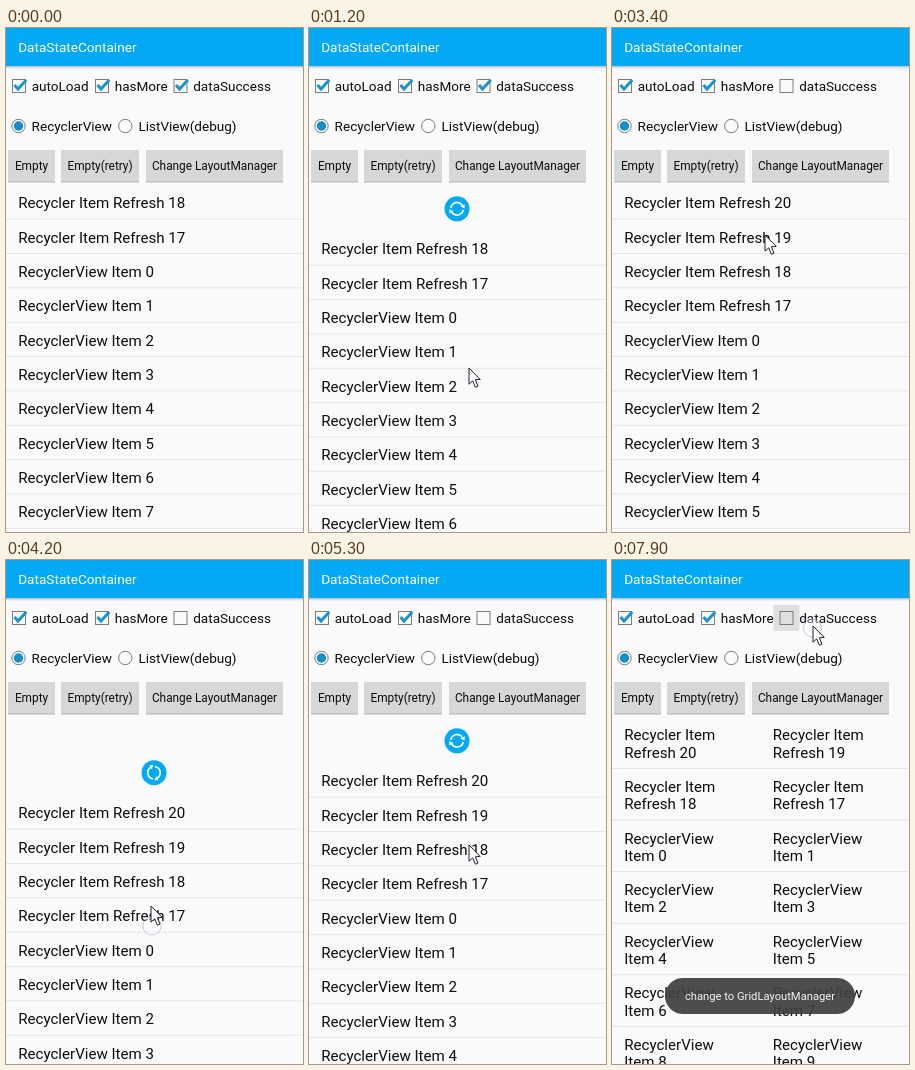
Animation, 297 px wide and 504 px high, one loop 8000 ms. Source, as an HTML page with a canvas:

```html
<!DOCTYPE html>
<html lang="en">
<head>
<meta charset="utf-8">
<title>DataStateContainer</title>
<style>
  html, body { margin: 0; width: 100%; height: 100%; overflow: hidden; background: #fafafa; }
  canvas { display: block; width: 297px; height: 504px; }
</style>
</head>
<body>
<canvas id="stage"></canvas>
<script>
const W = 297, H = 504, LOOP = 8000, STEP = 100;
const LIST_TOP = 157, ROW = 34.35, GRID_ROW = 51.6, REST = 46;
const LABEL = 13.55, ITEM = 15.1;
const BLUE = '#03a9f4', INK = '#0c0c0c', LINE = '#e6e6e6', FONT = 'Roboto, sans-serif';

const canvas = document.getElementById('stage');
const ctx = canvas.getContext('2d');
const dpr = window.devicePixelRatio || 1;
canvas.width = Math.round(W * dpr);
canvas.height = Math.round(H * dpr);

// Pointer path: time, x, y
const path = [
  [200, 176, 110], [500, 150, 200], [900, 148, 358], [1000, 150, 352],
  [1200, 160, 340], [2500, 160, 340], [2900, 206, 64], [3200, 207, 62],
  [3300, 208.5, 60.5], [3400, 153, 207], [3500, 153, 207], [4000, 148, 375],
  [4100, 146, 366], [4200, 145, 346], [4600, 158, 290], [5300, 160, 285],
  [5900, 171, 268], [6100, 175, 258], [6500, 175, 258], [6800, 179.5, 153],
  [7000, 183, 142], [7300, 184, 140], [7600, 199, 74], [7900, 201, 66]
];

const pulls = [
  { start: 600, y: 200, release: 1000, rest: 1200, done: 1600, end: 1900, spin: 1200 },
  { start: 3600, y: 207, release: 4200, rest: 4500, done: 5500, end: 5900, spin: 5300 }
];

const clamp = v => Math.max(0, Math.min(1, v));
const smooth = v => v * v * (3 - 2 * v);
const progress = (t, a, b) => clamp((t - a) / (b - a));
const within = (t, a, b) => t >= a && t < b;

function pointer(t) {
  const i = path.findIndex(k => k[0] >= t);
  if (i === 0) return { x: path[0][1], y: path[0][2] };
  const a = path[i - 1], b = path[i];
  const p = smooth(progress(t, a[0], b[0]));
  return { x: a[1] + (b[1] - a[1]) * p, y: a[2] + (b[2] - a[2]) * p };
}

// The device touch trails the pointer by one step
const touch = t => pointer(t - STEP);

function pullState(t) {
  const p = pulls.find(q => within(t, q.start, q.end));
  if (!p) return { offset: 0, icon: false, angle: 0 };
  const drag = s => Math.max(0, 0.49 * (touch(s).y - p.y));
  let offset, angle;
  if (t <= p.release) {
    offset = drag(t);
    angle = offset / 78 * Math.PI / 2;
  } else {
    const ease = 1 - (1 - progress(t, p.release, p.rest)) ** 2;
    offset = drag(p.release) + (REST - drag(p.release)) * ease;
    if (t > p.done) offset *= 1 - smooth(progress(t, p.done, p.end));
    angle = (t - p.spin) / 800 * Math.PI * 2;
  }
  return { offset, icon: t <= p.done, angle };
}

function text(s, x, y, size, color = INK, align = 'left') {
  ctx.font = `${size}px ${FONT}`;
  ctx.fillStyle = color;
  ctx.textAlign = align;
  ctx.fillText(s, x, y);
}

function rect(x, y, w, h, color) {
  ctx.fillStyle = color;
  ctx.fillRect(x, y, w, h);
}

function circle(x, y, r, fill, stroke, width = 1) {
  ctx.beginPath();
  ctx.arc(x, y, r, 0, Math.PI * 2);
  if (fill) { ctx.fillStyle = fill; ctx.fill(); }
  if (stroke) { ctx.strokeStyle = stroke; ctx.lineWidth = width; ctx.stroke(); }
}

function trace(points) {
  ctx.beginPath();
  points.forEach(([x, y]) => ctx.lineTo(x, y));
}

function toolbar() {
  rect(0, 0, W, 38, BLUE);
  const shadow = ctx.createLinearGradient(0, 38, 0, 41);
  shadow.addColorStop(0, '#b4c0c6');
  shadow.addColorStop(1, '#fafafa');
  rect(0, 38, W, 3, shadow);
  text('DataStateContainer', 12.2, 24.2, 13.6, '#fff');
}

function checkbox(x, label, checked, pressed) {
  if (pressed) rect(x - 6, 45, 26, 26, '#dfdfdf');
  ctx.strokeStyle = '#7c7c7c';
  ctx.lineWidth = 1;
  ctx.strokeRect(x + 0.5, 51.5, 13, 13);
  if (checked) {
    trace([[x + 2.5, 57], [x + 6, 61], [x + 14.3, 52]]);
    ctx.strokeStyle = '#1795cf';
    ctx.lineWidth = 3;
    ctx.stroke();
  }
  text(label, x + 19.7, 63.3, LABEL);
}

function radio(x, label, on) {
  circle(x, 98, 6.7, null, '#7c7c7c');
  if (on) circle(x, 98, 4.7, '#1490c8');
  text(label, x + 13.1, 102.8, LABEL);
}

function button(x, w, label, pressed) {
  rect(x, 122, w, 32, pressed ? '#bcbdbd' : '#d6d7d7');
  rect(x, 153.5, w, 1, '#b4b4b4');
  text(label, x + w / 2, 142.4, 11.85, INK, 'center');
}

function refreshIcon(y, angle) {
  ctx.save();
  ctx.translate(148, y);
  circle(0, 0, 12.5, BLUE);
  ctx.rotate(angle);
  ctx.lineWidth = 1.7;
  for (let i = 0; i < 2; i++) {
    ctx.beginPath();
    ctx.arc(0, 0, 6.3, Math.PI * 1.05, Math.PI * 1.83);
    ctx.strokeStyle = '#fff';
    ctx.stroke();
    trace([[3.4, -2.2], [7.6, -4.6], [7.6, -0.4]]);
    ctx.fillStyle = '#fff';
    ctx.fill();
    ctx.rotate(Math.PI);
  }
  ctx.restore();
}

function items(t) {
  const list = (t >= 2000 ? [20, 19, 18, 17] : [18, 17])
    .map(n => ['Recycler Item', `Refresh ${n}`]);
  for (let n = 0; n < 10; n++) list.push(['RecyclerView', `Item ${n}`]);
  return list;
}

function drawList(t) {
  const { offset, icon, angle } = pullState(t);
  const top = LIST_TOP + offset;
  const grid = t >= 7100;
  ctx.save();
  ctx.beginPath();
  ctx.rect(0, LIST_TOP, W, H - LIST_TOP);
  ctx.clip();
  if (icon && offset > 0) refreshIcon(top - 22.2, angle);
  items(t).forEach((item, i) => {
    if (grid) {
      const y = top + Math.floor(i / 2) * GRID_ROW;
      const x = i % 2 ? 160.8 : 12.2;
      item.forEach((line, k) => text(line, x, y + 23.3 + k * 17.2, ITEM));
      if (i % 2) rect(0, y + GRID_ROW - 0.7, W, 1, LINE);
    } else {
      const y = top + i * ROW;
      text(item.join(' '), 12.2, y + 23.3, ITEM);
      rect(0, y + ROW - 0.7, W, 1, LINE);
    }
  });
  ctx.restore();
}

function drawToast(t) {
  const a = progress(t, 7100, 7500);
  if (!a) return;
  ctx.save();
  ctx.globalAlpha = a;
  ctx.beginPath();
  ctx.roundRect(53, 418, 190, 36, 18);
  ctx.fillStyle = 'rgba(64,64,64,.93)';
  ctx.fill();
  text('change to GridLayoutManager', 148, 440, 11.2, '#f4f4f4', 'center');
  ctx.restore();
}

function drawPointer(t) {
  if (t < 200) return;
  const pressed = pulls.some(p => within(t, p.start, p.release + 1)) ||
    within(t, 3000, 3200) || within(t, 7000, 7200) || t >= 7900;
  if (pressed) {
    const p = touch(t);
    circle(p.x, p.y, 9, 'rgba(255,255,255,.4)', 'rgba(150,150,200,.5)');
  }
  const { x, y } = pointer(t);
  ctx.save();
  ctx.translate(x, y);
  trace([[0, 0], [0, 16.2], [3.7, 12.8], [6.4, 19.2], [9, 18.1], [6.3, 11.8], [11.2, 11.4]]);
  ctx.closePath();
  ctx.fillStyle = '#fff';
  ctx.fill();
  ctx.strokeStyle = '#20202c';
  ctx.lineWidth = 1;
  ctx.stroke();
  ctx.restore();
}

function draw(t) {
  ctx.setTransform(dpr, 0, 0, dpr, 0, 0);
  rect(0, 0, W, H, '#fafafa');
  toolbar();

  checkbox(6, 'autoLoad', true);
  checkbox(89, 'hasMore', true);
  checkbox(167.5, 'dataSuccess', t < 3100, within(t, 3000, 3200) || t >= 7900);
  radio(12.5, 'RecyclerView', true);
  radio(119.3, 'ListView(debug)', false);
  button(2, 47, 'Empty');
  button(55, 78, 'Empty(retry)');
  button(140, 137, 'Change LayoutManager', within(t, 7000, 7200));

  drawList(t);
  drawToast(t);
  drawPointer(t);
}

const begin = performance.now();
function tick() {
  const t = (performance.now() - begin) % LOOP;
  draw(Math.floor(t / STEP) * STEP);
  requestAnimationFrame(tick);
}
tick();
</script>
</body>
</html>
```
